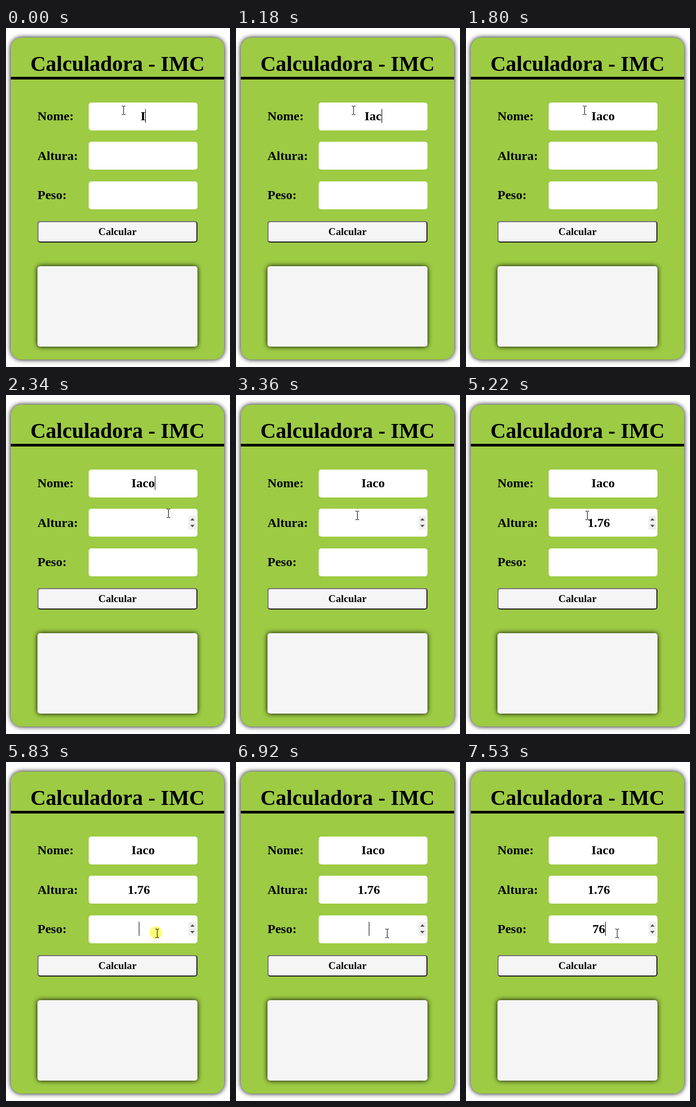
These frames come from a looping animation (420 by 632 pixels, 8 s). An HTML page with a canvas:

```html
<!DOCTYPE html>
<html lang="pt">
<head>
<meta charset="utf-8">
<title>Calculadora - IMC</title>
<style>
html, body { margin: 0; width: 100%; height: 100%; overflow: hidden; background: #fff; }
canvas { display: block; }
</style>
</head>
<body>
<canvas id="stage" width="420" height="632"></canvas>
<script>
const ctx = document.getElementById('stage').getContext('2d');
const LOOP = 8000;
const BLINK = 530;
const CLICK = 90;
const ROW = 73.5;
const GREEN = '#9dcb44';
const PALE = '#f5f5f5';

// focus: when the field is clicked; keys: when each character is typed
const fields = [
  { label: 'Nome:', text: 'Iaco', mid: 257, focus: -1000, keys: [-460, 620, 1180, 1270] },
  { label: 'Altura:', text: '1.76', mid: 249, focus: 2800, keys: [3810, 3980, 4440, 4690], number: true },
  { label: 'Peso:', text: '76', mid: 249, focus: 5830, keys: [7300, 7530], number: true }
];
fields.forEach((f, i) => {
  f.y = Math.floor(139 + ROW * i);
  f.base = Math.round(172 + ROW * i);
  f.blur = fields[i + 1]?.focus ?? LOOP;
});

// Pointer route: time, x, y
const route = [
  [1800, 220, 153], [1880, 387, 186], [2340, 304, 220], [2570, 227, 224],
  [5300, 227, 224], [5520, 400, 300], [5740, 283, 319]
];

function pointerAt(t) {
  const next = route.findIndex(p => p[0] > t);
  if (next === 0) return route[0].slice(1);
  if (next < 0) return route.at(-1).slice(1);
  const a = route[next - 1], b = route[next];
  const k = (t - a[0]) / (b[0] - a[0]);
  return [1, 2].map(i => Math.round(a[i] + (b[i] - a[i]) * k));
}

const isOver = (f, x, y) => x > 155 && x < 359 && y >= f.y && y < f.y + 52;

function rect(x, y, w, h, r, fill, glow = 0) {
  ctx.save();
  ctx.shadowColor = '#000';
  ctx.shadowBlur = glow;
  ctx.fillStyle = fill;
  ctx.beginPath();
  ctx.roundRect(x, y, w, h, r);
  ctx.fill();
  ctx.restore();
}

function text(str, x, y, size = 24, align = 'center') {
  ctx.font = `bold ${size}px "Liberation Serif", "Times New Roman", serif`;
  ctx.textAlign = align;
  ctx.fillStyle = '#000';
  ctx.fillText(str, x, y);
}

function drawButton() {
  // Outset border: light on the top left, dark on the bottom right
  rect(59, 360, 300, 40, 5, '#212121');
  ctx.save();
  ctx.clip(new Path2D('M59 400L79 380H339L359 360H59Z'));
  rect(59, 360, 300, 40, 5, '#767676');
  ctx.restore();
  rect(61, 362, 296, 36, 3, PALE);
  text('Calcular', 209, 386, 19.2);
}

function drawSpinner(f) {
  const top = f.base - 21;
  rect(342, top, 15, 26, 0, '#efefef');
  ctx.save();
  ctx.translate(349.5, top + 13);
  ctx.fillStyle = '#505050';
  for (const dir of [-1, 1]) {
    ctx.fill(new Path2D(`M0 ${8.5 * dir}L-4 ${4 * dir}H4Z`));
  }
  ctx.restore();
}

function drawField(f, t, x, y) {
  const focused = t >= f.focus && t < f.blur;
  const typed = f.keys.filter(k => k <= t);
  const value = f.text.slice(0, typed.length);
  text(f.label, 59, f.base, 24, 'left');
  rect(155, f.y, 204, 52, 5, '#fff');
  if (f.number && (focused || isOver(f, x, y))) drawSpinner(f);
  text(value, f.mid, f.base);
  const idle = t - Math.max(f.focus, ...typed);
  if (focused && idle % (2 * BLINK) < BLINK) {
    const end = Math.floor(f.mid + ctx.measureText(value).width / 2 + 0.05);
    ctx.fillRect(end, f.base - 21, 1, 26);
  }
}

function drawPointer(t, x, y) {
  ctx.save();
  ctx.translate(x, y);
  if (fields.some(f => t >= f.focus && t < f.focus + CLICK)) {
    ctx.fillStyle = '#fdfd7c';
    ctx.beginPath();
    ctx.arc(-2, -1, 12, 0, 2 * Math.PI);
    ctx.fill();
  }
  if (fields.some(f => isOver(f, x, y))) {
    ctx.fillStyle = '#000';
    ctx.fillRect(0, -7, 1, 15);
    for (const dy of [-8, 8]) {
      ctx.fillRect(-3, dy, 3, 1);
      ctx.fillRect(1, dy, 3, 1);
    }
  } else {
    const arrow = new Path2D('M.5 .5V16.5L4.5 13L7 18.5L9.5 17.5L7 12H12Z');
    ctx.fillStyle = '#fff';
    ctx.strokeStyle = '#000';
    ctx.fill(arrow);
    ctx.stroke(arrow);
  }
  ctx.restore();
}

function draw(t) {
  const [x, y] = pointerAt(t);
  rect(0, 0, 420, 632, 0, '#fff');
  rect(9, 18, 400, 600, 20, GREEN, 10);
  text('Calculadora - IMC', 209, 80, 40);
  ctx.fillRect(9, 91, 400, 5);
  fields.forEach(f => drawField(f, t, x, y));
  drawButton();
  rect(59, 444, 300, 150, 5, PALE, 10);
  drawPointer(t, x, y);
}

const start = performance.now();
function tick() {
  draw((performance.now() - start) % LOOP);
  requestAnimationFrame(tick);
}
tick();
</script>
</body>
</html>
```
